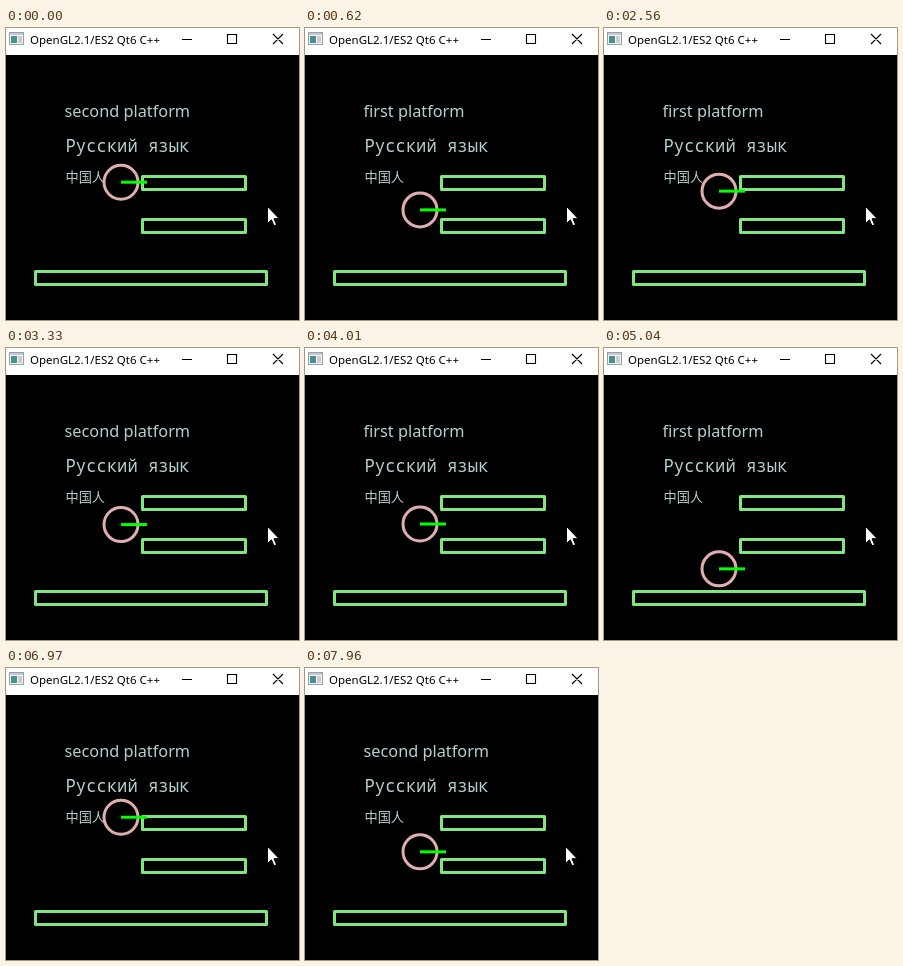
Recreate the animation shown at these times as an HTML page. Size 293 px wide and 292 px high, loop 7990 ms.

```html
<!DOCTYPE html>
<html lang="en">
<head>
<meta charset="utf-8">
<title>Bouncing ball with ray cast</title>
<style>
  html, body { margin: 0; width: 100%; height: 100%; overflow: hidden; background: #000; }
  svg { display: block; }
  text { fill: #b4d2d0; }
  .title { font: 11.5px "Noto Sans", sans-serif; fill: #000; }
  .label { font: 500 16.3px "Noto Sans", sans-serif; }
  .russian { font: 500 17.2px "Noto Sans Mono", monospace; }
  .chinese { font: 13.2px "Noto Sans CJK SC", "Noto Sans CJK JP", sans-serif; }
  .platforms { fill: none; stroke: #80e680; stroke-width: 3; stroke-linejoin: round; }
  .buttons { fill: none; stroke: #000; stroke-width: 1.1; }
</style>
</head>
<body>
<svg width="293" height="292" viewBox="0 0 293 292">
  <rect width="293" height="27" fill="#fff"/>
  <g>
    <rect x="3.5" y="4.5" width="14" height="12" fill="#f4f4f4" stroke="#9a9fa5"/>
    <rect x="4" y="5" width="13" height="2" fill="#c3cad1"/>
    <rect x="5" y="8" width="6" height="7" fill="#4a8f8a"/>
    <rect x="12" y="8" width="4" height="7" fill="#c9ced3"/>
  </g>
  <text class="title" x="24" y="16">OpenGL2.1/ES2 Qt6 C++</text>
  <path class="buttons" d="M176 11.5h10M221.5 6.5h9v9h-9zM267 6l10 10m0-10l-10 10"/>

  <g class="platforms">
    <rect x="136.5" y="148.5" width="103" height="13"/>
    <rect x="136.5" y="191.5" width="103" height="13"/>
    <rect x="29.5" y="243.5" width="231" height="13"/>
  </g>
  <text class="label" id="label" x="58.5" y="89"></text>
  <text class="russian" x="59.5" y="124">Русский язык</text>
  <text class="chinese" x="59.5" y="154">中国人</text>

  <g id="ball">
    <circle r="17" fill="none" stroke="#e1aeae" stroke-width="3"/>
    <path d="M0 0H26" stroke="#0f0" stroke-width="3"/>
  </g>
  <path id="cursor" d="M0 0v17l3.9-3.7 2.6 6 2.6-1.1-2.6-6h5.2z" fill="#fff" stroke="#000"/>
</svg>
<script>
const LOOP = 7990;
const GRAVITY = 246;      // px per second squared
const GROUND = 224.3;     // ball centre while resting on the floor
const RESET = 5487;       // ball is put back at its starting height
const CURSOR_NUDGE = 7900;

// Each flight is [time of its top in ms, height of its top].
const firstRun = [[-582, 112.4], [1243, 134.3], [2875, 151], [4313, 164.8], [5645, 176]];
const secondRun = [[RESET, 112.4], [7324, 133.9]];

// Moments when the ray meets the other platform; the label starts on "second".
const rayHits = [215, 767, 1920, 2568, 3442, 6020, 6283, 6846];

const label = document.getElementById("label");
const ball = document.getElementById("ball");
const cursor = document.getElementById("cursor");

function ballY(t) {
  const flights = t < RESET ? firstRun : secondRun;
  const heights = flights.map(([top, y]) => y + GRAVITY / 2 * ((t - top) / 1000) ** 2);
  return Math.min(GROUND, ...heights);
}

function draw(t) {
  ball.setAttribute("transform", `translate(115 ${ballY(t).toFixed(2)})`);
  const hits = rayHits.filter(time => time <= t).length;
  label.textContent = (hits % 2 ? "first" : "second") + " platform";
  cursor.setAttribute("transform", `translate(${t < CURSOR_NUDGE ? 261.5 : 260.5} 178.5)`);
}

const start = performance.now();
function frame() {
  draw((performance.now() - start) % LOOP);
  requestAnimationFrame(frame);
}
frame();
</script>
</body>
</html>
```
